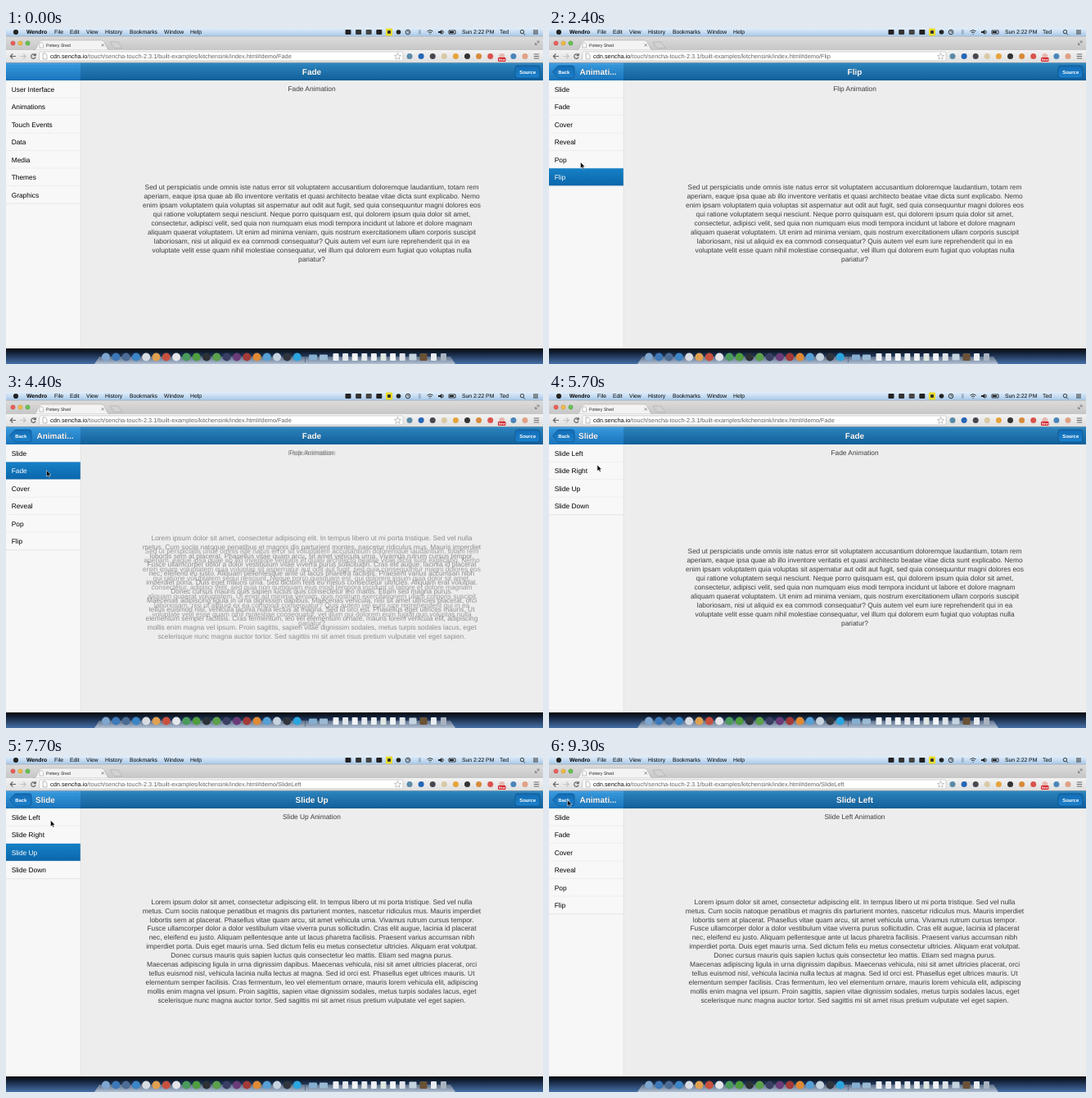
An HTML page for the animation above (9400 ms loop, 656 px wide and 410 px high).

```html
<!DOCTYPE html>
<html lang="en">
<head>
<meta charset="utf-8">
<title>Touch animation demo</title>
<style>
  html, body { margin: 0; width: 100%; height: 100%; overflow: hidden; }
  svg { display: block; width: 656px; height: 410px; font-family: "Liberation Sans", Arial, sans-serif; text-rendering: geometricPrecision; }
  .menu { font-size: 6.8px; }
  .url { font-size: 7.35px; fill: #666; }
  .title { font-size: 10px; font-weight: bold; fill: #fff; text-shadow: 0 -.5px 0 #0a3a60; }
  .button { font-size: 5.9px; font-weight: bold; fill: #fff; text-anchor: middle; }
  .item { font-size: 8.35px; fill: #000; }
  .on { fill: #fff; }
  .body { font-size: 8.4px; fill: #3c3c3c; }
  .mid { text-anchor: middle; }
</style>
</head>
<body>
<svg viewBox="0 0 656 410">
  <defs>
    <linearGradient id="bar" x2="0" y2="1"><stop stop-color="#e2eefa"/><stop offset="1" stop-color="#a9c9e8"/></linearGradient>
    <linearGradient id="tabs" x2="0" y2="1"><stop stop-color="#dcdcdc"/><stop offset="1" stop-color="#c6c6c6"/></linearGradient>
    <linearGradient id="tools" x2="0" y2="1"><stop stop-color="#f3f3f3"/><stop offset="1" stop-color="#dedede"/></linearGradient>
    <linearGradient id="head" x2="0" y2="1"><stop stop-color="#3a90c8"/><stop offset=".12" stop-color="#2a80b9"/><stop offset="1" stop-color="#115f9a"/></linearGradient>
    <linearGradient id="side" x2="0" y2="1"><stop stop-color="#50a8e4"/><stop offset=".12" stop-color="#3596da"/><stop offset="1" stop-color="#1a74bb"/></linearGradient>
    <linearGradient id="push" x2="0" y2="1"><stop stop-color="#136db5"/><stop offset="1" stop-color="#1c80cb"/></linearGradient>
    <linearGradient id="hit" x2="0" y2="1"><stop stop-color="#1680c6"/><stop offset="1" stop-color="#0b66aa"/></linearGradient>
    <linearGradient id="desk" x2="0" y2="1"><stop stop-color="#04070b"/><stop offset=".3" stop-color="#14233a"/><stop offset="1" stop-color="#4670a8"/></linearGradient>
    <linearGradient id="shelf" x2="0" y2="1"><stop stop-color="#5c6e88"/><stop offset="1" stop-color="#b4c2d4"/></linearGradient>
    <clipPath id="sideClip"><path d="M0 42H91V391H0Z"/></clipPath>
    <clipPath id="pageClip"><path d="M91.5 64H656V391H91.5Z"/></clipPath>
  </defs>

  <!-- Menu bar -->
  <path fill="url(#bar)" d="M0 0H656V10H0Z"/>
  <circle cx="12" cy="5" r="3.1" fill="#222"/>
  <g class="menu" id="menu">
    <text x="25" y="7.4" font-weight="bold">Wendro</text>
    <text x="557" y="7.4">Sun 2:22 PM</text>
    <text x="603" y="7.4">Ted</text>
  </g>
  <g fill="none" stroke="#222" stroke-width=".9">
    <path d="M514.5 4Q518 1 521.5 4M516 5.7Q518 4 520 5.7M517.5 7.5H518.5M541 3H549V7H541ZM644 3H650M644 5H650M644 7H650M632 6.5L634 8.5M533.5 3Q535 5 533.5 7"/>
    <circle cx="630.5" cy="4.6" r="2.2"/><circle cx="491" cy="5" r="2.8"/>
    <path d="M491 3.4V5H492.4"/>
    <path d="M503.5 3.2L507 6.5 505 8V2L507 3.6 503.5 6.6" stroke="#8196ab" stroke-width=".7"/>
  </g>
  <path d="M528 4H530L532.5 2V8L530 6H528ZM542 4H547V6H542Z" fill="#222"/>
  <g id="status"></g>

  <!-- Tab strip and toolbar -->
  <path fill="url(#tabs)" d="M0 10H656V27H0Z"/>
  <path d="M0 10.2H656" stroke="#8c98a4" stroke-width=".5"/>
  <g stroke-width=".5">
    <circle cx="8.5" cy="18.5" r="2.6" fill="#ee5f58" stroke="#b8443e"/>
    <circle cx="17.5" cy="18.5" r="2.6" fill="#f3ba48" stroke="#bf8f30"/>
    <circle cx="26.5" cy="18.5" r="2.6" fill="#66c450" stroke="#479038"/>
    <path d="M34 27Q37 26.5 38.5 21T43 15H117Q120 15 122 21T127 27Z" fill="#f3f3f3" stroke="#a2a2a2"/>
    <path d="M127 17H137L142 24.5H132Z" fill="#d2d2d2" stroke="#a2a2a2"/>
    <path d="M41 18H44L45.5 19.5V24H41Z" fill="#fff" stroke="#888"/>
  </g>
  <text x="49" y="22.9" font-size="5.2" fill="#222">Pottery Shed</text>
  <path d="M116.6 19.3L119.8 22.5M119.8 19.3L116.6 22.5M646.5 20.5L651 16M648.5 16H651V18.5M646.5 18V20.5H649" fill="none" stroke="#777" stroke-width=".8"/>
  <path fill="url(#tools)" d="M0 27H656V43H0Z"/>
  <g fill="none" stroke="#666" stroke-width="1.2">
    <path d="M12 34.5H5.5M8.3 31.5L5.3 34.5 8.3 37.5M35.6 33A2.7 2.7 0 1 0 36 35.5M36.2 31V33.6H33.6"/>
    <path d="M17.5 34.5H24M21.2 31.5L24.2 34.5 21.2 37.5" stroke="#c2c2c2"/>
    <path d="M644.8 32H651.2M644.8 34.5H651.2M644.8 37H651.2"/>
  </g>
  <rect x="41" y="29" width="444" height="11" rx="1.5" fill="#fff" stroke="#b5b5b5" stroke-width=".6"/>
  <path d="M45 31H48L50 33V38H45Z" fill="#fff" stroke="#888" stroke-width=".6"/>
  <path d="M478.5 30.5L479.6 33.3 482.5 33.5 480.3 35.4 481 38.3 478.5 36.7 476 38.3 476.7 35.4 474.5 33.5 477.4 33.3Z" fill="#fff" stroke="#999" stroke-width=".6"/>
  <g id="extensions"></g>
  <rect x="601" y="36" width="9.5" height="5" rx="1" fill="#d3222a"/>
  <text x="605.8" y="40" class="mid" font-size="4" font-weight="bold" fill="#fff">New</text>

  <!-- Application -->
  <path fill="#ededed" d="M0 64H656V391H0Z"/>
  <path fill="#f7f7f7" d="M0 64H91V391H0Z"/>
  <path fill="url(#head)" d="M91 42.5H656V64H91Z"/>
  <path fill="url(#side)" d="M0 42.5H91V64H0Z"/>
  <path d="M0 42.5H656" stroke="#5f7f98" stroke-width=".6"/>
  <rect x="622" y="46" width="30" height="15" rx="3" fill="url(#push)" stroke="#0d4f88" stroke-width=".7"/>
  <text x="637.2" y="55.8" class="button">Source</text>
  <g id="scene"></g>
  <path d="M91.2 64V391" stroke="#dcdcdc" stroke-width=".6"/>

  <!-- Desktop and dock -->
  <path fill="url(#desk)" d="M0 391H656V410H0Z"/>
  <path d="M114 401H543L549 410H108Z" fill="url(#shelf)"/>
  <path d="M365.5 401V409" stroke="#39485c" stroke-dasharray="1"/>
  <g id="dock"></g>
  <path id="cursor" d="M0 0V7.6L1.8 6 3 8.6 4.3 8 3.1 5.5H5.4Z" fill="#000" stroke="#fff" stroke-width=".5"/>
</svg>

<script>
const LOOP = 9400, MOVE = 320, ROW = 21.45, MID = 373.5;
const $ = id => document.getElementById(id);
const text = (x, y, s, cls) => `<text x="${x}" y="${y}" class="${cls}">${s}</text>`;
const group = (s, transform, opacity = 1) => `<g transform="${transform}" opacity="${opacity}">${s}</g>`;
const clamp = v => Math.min(1, Math.max(0, v));
const ease = p => p * p * (3 - 2 * p);
const latest = (steps, t) => steps.filter(s => s[0] <= t).pop();

const sed = `Sed ut perspiciatis unde omnis iste natus error sit voluptatem accusantium doloremque laudantium, totam rem
aperiam, eaque ipsa quae ab illo inventore veritatis et quasi architecto beatae vitae dicta sunt explicabo. Nemo
enim ipsam voluptatem quia voluptas sit aspernatur aut odit aut fugit, sed quia consequuntur magni dolores eos
qui ratione voluptatem sequi nesciunt. Neque porro quisquam est, qui dolorem ipsum quia dolor sit amet,
consectetur, adipisci velit, sed quia non numquam eius modi tempora incidunt ut labore et dolore magnam
aliquam quaerat voluptatem. Ut enim ad minima veniam, quis nostrum exercitationem ullam corporis suscipit
laboriosam, nisi ut aliquid ex ea commodi consequatur? Quis autem vel eum iure reprehenderit qui in ea
voluptate velit esse quam nihil molestiae consequatur, vel illum qui dolorem eum fugiat quo voluptas nulla
pariatur?`;
const lorem = `Lorem ipsum dolor sit amet, consectetur adipiscing elit. In tempus libero ut mi porta tristique. Sed vel nulla
metus. Cum sociis natoque penatibus et magnis dis parturient montes, nascetur ridiculus mus. Mauris imperdiet
lobortis sem at placerat. Phasellus vitae quam arcu, sit amet vehicula urna. Vivamus rutrum cursus tempor.
Fusce ullamcorper dolor a dolor vestibulum vitae viverra purus sollicitudin. Cras elit augue, lacinia id placerat
nec, eleifend eu justo. Aliquam pellentesque ante ut lacus pharetra facilisis. Praesent varius accumsan nibh
imperdiet porta. Duis eget mauris urna. Sed dictum felis eu metus consectetur ultricies. Aliquam erat volutpat.
Donec cursus mauris quis sapien luctus quis consectetur leo mattis. Etiam sed magna purus.
Maecenas adipiscing ligula in urna dignissim dapibus. Maecenas vehicula, nisi sit amet ultricies placerat, orci
tellus euismod nisl, vehicula lacinia nulla lectus at magna. Sed id orci est. Phasellus eget ultrices mauris. Ut
elementum semper facilisis. Cras fermentum, leo vel elementum ornare, mauris lorem vehicula elit, adipiscing
mollis enim magna vel ipsum. Proin sagittis, sapien vitae dignissim sodales, metus turpis sodales lacus, eget
scelerisque nunc magna auctor tortor. Sed sagittis mi sit amet risus pretium vulputate vel eget sapien.`;

// Each demo: click time, name, text, effect
const demos = [
  [-1000, 'Fade', sed, 'fade'], [1850, 'Flip', sed, 'flip'], [2700, 'Pop', lorem, 'pop'],
  [4050, 'Fade', sed, 'fade'], [6250, 'Slide Up', lorem, 'up'], [7700, 'Slide Left', lorem, 'left'],
];

// Each list: click time, title, title x, rows, direction, [time, selected row]
const main = ['User Interface', 'Animations', 'Touch Events', 'Data', 'Media', 'Themes', 'Graphics'];
const kinds = ['Slide', 'Fade', 'Cover', 'Reveal', 'Pop', 'Flip'];
const slides = ['Slide Left', 'Slide Right', 'Slide Up', 'Slide Down'];
const lists = [
  [-1000, '', 0, main, 1, [[900, 1]]],
  [900, 'Animati...', 37.5, kinds, 1, [[1900, 5], [2750, 4], [4100, 1], [5050, 0]]],
  [5000, 'Slide', 36, slides, 1, [[6300, 2], [7800, 0]]],
  [8200, 'Animati...', 37.5, kinds, -1, []],
];

// Pointer stops: time, x, y
const stops = [
  [100, 120, 412], [800, 44, 97], [1350, 44, 97], [1780, 40, 180], [2100, 40, 180], [2550, 38, 158],
  [3400, 38, 158], [3900, 49.5, 95.5], [4500, 49.5, 95.5], [4850, 53, 74], [5300, 53, 74], [5700, 59, 89],
  [6100, 55, 115], [6900, 55, 115], [7450, 54.5, 78.5], [7850, 54.5, 78.5], [8150, 22.5, 53.5], [LOOP, 22.5, 53.5],
];

function page([, name, body]) {
  const lines = body.split('\n');
  const top = 240.8 - (lines.length - 1) * 5.465;
  return text(MID, 77, name + ' Animation', 'body mid') +
    lines.map((line, i) => text(MID, top + i * 10.93, line, 'body mid')).join('');
}

const around = (sx, sy) => `translate(${MID} 227.5) scale(${sx} ${sy}) translate(${-MID} -227.5)`;

// Poses of the leaving and the entering page as [transform, opacity]
const effects = {
  fade: p => [['', 1 - p], ['', p]],
  flip: p => [[around(Math.max(0, Math.cos(p * Math.PI)), 1), 1], [around(Math.max(0, -Math.cos(p * Math.PI)), 1), 1]],
  pop: p => [[around(1 - p, 1 - p), 1 - p], [around(p, p), p]],
  up: p => [[`translate(0 ${-327 * p})`, 1], [`translate(0 ${327 * (1 - p)})`, 1]],
  left: p => [[`translate(${-565 * p})`, 1], [`translate(${565 * (1 - p)})`, 1]],
};

function drawPage(t) {
  const current = latest(demos, t - 200), p = ease(clamp((t - current[0] - 200) / MOVE));
  if (p === 1) return page(current);
  const poses = effects[current[3]](p);
  return [demos[demos.indexOf(current) - 1], current].map((d, i) => group(page(d), ...poses[i])).join('');
}

function listRows([, , , rows, , hits], t) {
  const selected = (latest(hits, t) || [])[1];
  return rows.map((label, i) => {
    const y = 64 + i * ROW, on = i === selected;
    return `<rect y="${y}" width="91" height="${ROW}" fill="${on ? 'url(#hit)' : '#f8f8f8'}"/>` +
      `<path d="M0 ${y + ROW}H91" stroke="#dfdfdf" stroke-width=".7"/>` +
      text(6.7, y + 14, label, on ? 'item on' : 'item');
  }).join('');
}

function drawList(t) {
  const current = latest(lists, t - 100), index = lists.indexOf(current);
  const p = ease(clamp((t - current[0] - 100) / MOVE));
  const view = (list, shift, opacity) =>
    group(listRows(list, t) + group(text(list[2], 57.3, list[1], 'title'), '', opacity), `translate(${shift})`);
  const back = index ? group('<path d="M4.5 53.5L9.5 47.5Q10.5 46 12.5 46H28Q31 46 31 49V58Q31 61 28 61H12.5Q10.5 61 9.5 59.5Z" ' +
    'fill="url(#push)" stroke="#0d4f88" stroke-width=".7"/>' + text(18.3, 55.8, 'Back', 'button'), '', index > 1 ? 1 : p) : '';
  const old = p < 1 ? view(lists[index - 1], -91 * p * current[4], 1 - p) : '';
  return old + view(current, 91 * (1 - p) * current[4], p) + back;
}

function pointer(t) {
  const i = Math.max(0, stops.findIndex(s => s[0] > t) - 1);
  const [a, b] = [stops[i], stops[i + 1]], p = ease(clamp((t - a[0]) / (b[0] - a[0])));
  return `translate(${a[1] + (b[1] - a[1]) * p} ${a[2] + (b[2] - a[2]) * p})`;
}

function draw() {
  const t = performance.now() % LOOP;
  $('scene').innerHTML =
    `<text x="54" y="37" class="url"><tspan fill="#111">cdn.sencha.io</tspan>/touch/sencha-touch-2.3.1/built-examples/kitchensink/index.html#demo/${latest(demos, t)[1].replace(' ', '')}</text>` +
    text(MID, 57.3, latest(demos, t - 100)[1], 'title mid') +
    `<g clip-path="url(#pageClip)">${drawPage(t)}</g><g clip-path="url(#sideClip)">${drawList(t)}</g>`;
  $('cursor').setAttribute('transform', pointer(t));
  requestAnimationFrame(draw);
}

// Plain icons: a row of colours from x on, spaced by step
const dots = (x, step, y, r, colors) => colors.split(' ').map((c, i) =>
  `<circle cx="${x + i * step}" cy="${y}" r="${r}" fill="#${c}"/>`).join('');
const squares = (x, step, y, w, h, colors) => colors.split(' ').map((c, i) =>
  `<rect x="${x + i * step - w / 2}" y="${y - h / 2}" width="${w}" height="${h}" rx="1" fill="#${c}"/>`).join('');

const menus = { File: 59, Edit: 78, View: 98, History: 121, Bookmarks: 151, Window: 193, Help: 225 };
$('menu').innerHTML += Object.entries(menus).map(([s, x]) => text(x, 7.4, s, '')).join('');
$('status').innerHTML = squares(418, 12.6, 5, 7, 6, '222 333 444 222') +
  squares(468, 0, 5, 8, 9, 'e8dc28') + squares(468, 0, 5, 4, 4, '333') + dots(479.5, 0, 5, 2.8, '222');
$('extensions').innerHTML = dots(493, 14.1, 34.5, 3.5, '5b8ba8 2667b5 4a4650 d8c9a6 e5a33c 333 d78a3c d9544d e5b8b0 4a86b8 e0a184');
$('dock').innerHTML =
  dots(122, 12.3, 401.5, 5, '7fa6cf 3d78b8 4b6c94 3b86c6 d8dce2 e0a050 c9503f e4e6ea 4a9a5c 4f9d3f 2c3136 5ba04a 3a3f63 6b3b78 a33a38 e08a35 56a0d6 c7d3de 30343c 2ba5de') +
  squares(375, 13, 402, 10, 7, '86aed0 9ab9d3') +
  squares(403, 11.6, 401.5, 7, 9, 'eef1f4 e3e7ec f4f6f8 e6eaee eef1f4 dfe7e1 f2f4f6 dfe4ea') +
  squares(497, 0, 401.5, 9, 8, 'c5d3df') + squares(510, 0, 401.5, 9, 9, '6a5236') +
  squares(522.5, 12, 401.5, 7, 9, 'e9edf1 a9b3bf');
draw();
</script>
</body>
</html>
```
